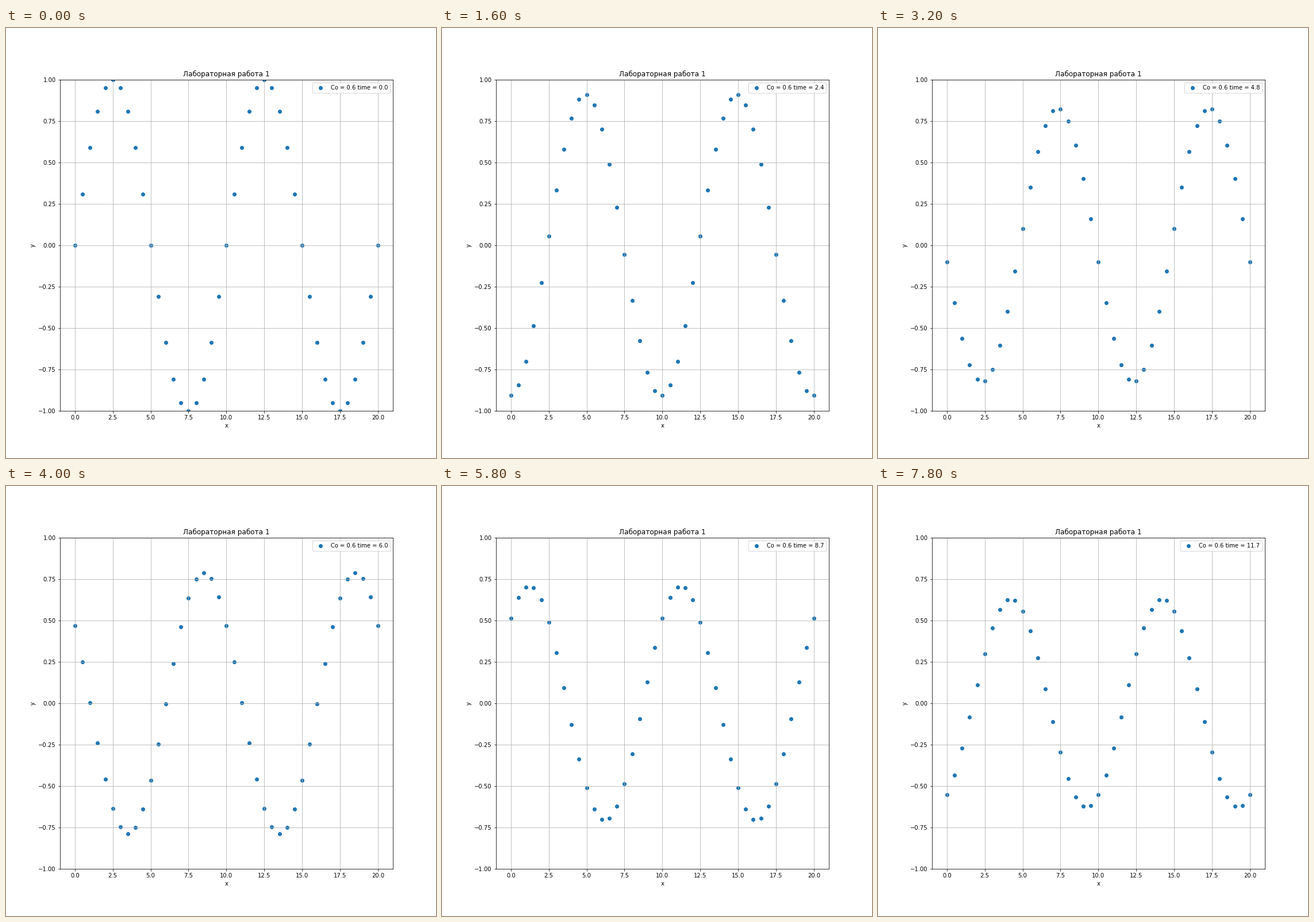
A matplotlib script for the animation above (8 s loop, 748 by 748 pixels).

```python
import numpy as np
import matplotlib.pyplot as plt
from matplotlib.animation import FuncAnimation

DPI = 72
SIDE = (748 + 1e-6) / DPI  # guards against rounding down to 747 px
FRAMES = 40
COURANT = 0.6
DX = 0.5
DT = COURANT * DX
PERIOD = 10.0

x = np.arange(0, 20 + DX / 2, DX)
wave = 2 * np.pi / PERIOD

# One upwind step scales and turns the wave by this complex factor.
step_gain = 1 - COURANT * (1 - np.exp(-1j * wave * DX))


def solution(n):
    return (step_gain ** n * np.exp(1j * wave * x)).imag


def caption(n):
    return f"Co = {COURANT} time = {n * DT:.1f}"


plt.rcParams["font.family"] = "DejaVu Sans"
fig, ax = plt.subplots(figsize=(SIDE, SIDE), dpi=DPI)
dots = ax.scatter(x, solution(0), label=caption(0))
ax.set(xlim=(-1, 21), ylim=(-1, 1), xlabel="x", ylabel="y",
       title="Лабораторная работа 1")
ax.grid(True)
label = ax.legend(loc="upper right").get_texts()[0]


def update(n):
    dots.set_offsets(np.column_stack([x, solution(n)]))
    label.set_text(caption(n))
    return dots, label


anim = FuncAnimation(fig, update, frames=FRAMES, interval=200,
                     init_func=lambda: update(0), repeat=True,
                     repeat_delay=0, blit=False)
plt.show()
```
